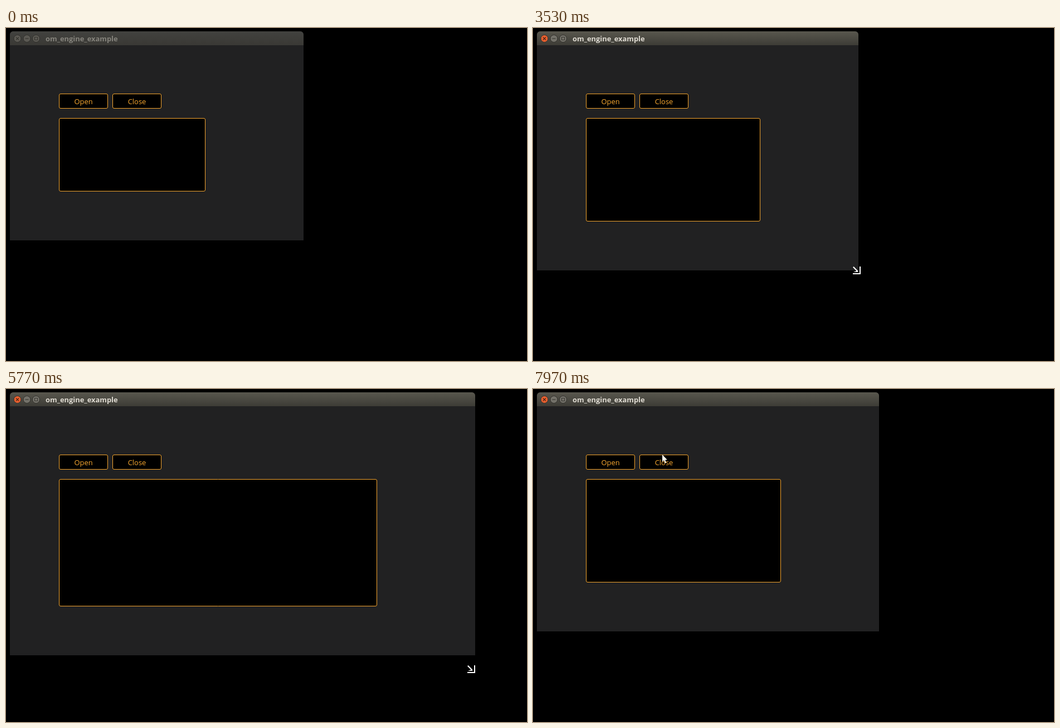
An HTML page with a canvas for the animation above (8 s loop, 935 by 599 pixels).

```html
<!DOCTYPE html>
<html lang="en">
<head>
<meta charset="utf-8">
<title>Window resize</title>
<style>
  html, body { margin: 0; height: 100%; overflow: hidden; background: #000; }
  canvas { display: block; }
</style>
</head>
<body>
<canvas id="stage" width="935" height="599"></canvas>
<script>
const ctx = document.getElementById('stage').getContext('2d');
const LOOP = 8000, POINTER_IN = 1200, AT_CORNER = 2150, GRAB = 2570, RELEASE = 7330;
const SWING = 465, LAG = 40;
const LEFT = 7, TOP = 6, TITLE_BOTTOM = 31, ORANGE = '#f4a52f';

const pose = (time, x, y) => ({ time, x, y });

// The corner swings out and back; both turning points drift down and right
const swings = Array.from({ length: 5 }, (_, n) => {
  const i = n + 1, time = GRAB + i * SWING;
  return i % 2 ? pose(time, 785 + 5 * i, 583 + 3 * i)
               : pose(time, 560 + 12.5 * i, 375 + 32.5 * i);
});

const poses = [
  pose(POINTER_IN, 872, 452), pose(1830, 577, 408), pose(GRAB, 535, 386),
  ...swings,
  pose(5290, 740, 490), pose(5690, 844, 472), pose(5880, 835, 570),
  pose(6350, 640, 590), pose(6810, 611, 512),
  pose(RELEASE, 622, 440), pose(7970, 232, 118)
];

const clamp = (v, lo, hi) => Math.min(hi, Math.max(lo, v));

// Eases from one turning point to the next
function pointerAt(time) {
  const t = clamp(time, POINTER_IN, poses[poses.length - 1].time);
  const i = Math.max(1, poses.findIndex(p => p.time >= t));
  const a = poses[i - 1], b = poses[i];
  const ease = (1 - Math.cos(Math.PI * (t - a.time) / (b.time - a.time))) / 2;
  return [a.x + (b.x - a.x) * ease, a.y + (b.y - a.y) * ease].map(Math.round);
}

function label(text, x, y, color, weight, align) {
  ctx.font = `${weight} 12.9px "Open Sans", "Noto Sans", sans-serif`;
  ctx.textAlign = align;
  ctx.fillStyle = color;
  ctx.fillText(text, x, y);
}

function outlinedBox(left, top, right, bottom) {
  ctx.beginPath();
  ctx.roundRect(left + 0.5, top + 0.5, right - left - 1, bottom - top - 1, 2.5);
  ctx.fillStyle = '#000';
  ctx.fill();
  ctx.strokeStyle = ORANGE;
  ctx.lineWidth = 1;
  ctx.stroke();
}

function button(text, left) {
  outlinedBox(left, 118, left + 88, 145);
  label(text, left + 44, 137, ORANGE, 500, 'center');
}

function titleButton(x, fill, ink, icon) {
  ctx.beginPath();
  ctx.arc(x, 19, 6.5, 0, Math.PI * 2);
  ctx.fillStyle = fill;
  ctx.fill();
  ctx.strokeStyle = '#302f2b';
  ctx.lineWidth = 1;
  ctx.stroke();
  ctx.save();
  ctx.translate(x, 19);
  ctx.strokeStyle = ink;
  ctx.lineWidth = 1.2;
  ctx.stroke(new Path2D(icon));
  ctx.restore();
}

function panel(right, bottom, fill) {
  ctx.beginPath();
  ctx.roundRect(LEFT, TOP, right - LEFT, bottom - TOP, [6, 6, 0, 0]);
  ctx.fillStyle = fill;
  ctx.fill();
}

function drawWindow(right, bottom, active) {
  const title = ctx.createLinearGradient(0, TOP, 0, TITLE_BOTTOM);
  title.addColorStop(0, active ? '#59574e' : '#42423f');
  title.addColorStop(1, active ? '#3d3c36' : '#3a3935');
  panel(right, bottom, '#212122');
  panel(right, TITLE_BOTTOM, title);

  const grey = active ? '#74726a' : '#5b5953', ink = active ? '#3a3934' : '#363530';
  titleButton(20.5, active ? '#e8602f' : grey, active ? '#4d2416' : ink, 'M-2.5-2.5L2.5 2.5M2.5-2.5L-2.5 2.5');
  titleButton(37.5, grey, ink, 'M-3 0H3');
  titleButton(54, grey, ink, 'M-2.5-2.5H2.5V2.5H-2.5Z');
  label('om_engine_example', 71, 23.5, active ? '#dfdbd2' : '#85837c', 700, 'left');

  button('Open', 95);
  button('Close', 191);
  outlinedBox(95, 162, right - 176, bottom - 88);
}

const arrow = new Path2D('M0 0V13L3 10.3 5 15.5 7.3 14.5 5.2 9.7 8.8 9.2Z');
const resizer = new Path2D('M-13-1H-1V-13H1V1H-13Z M-13-11.5L-11.5-13-4-5.5V-11-3H-12L-6.5-5Z');

function drawPointer(x, y, shape, color) {
  ctx.save();
  ctx.translate(x, y);
  ctx.fillStyle = color;
  ctx.fill(shape);
  ctx.restore();
}

function draw(t) {
  ctx.fillStyle = '#000';
  ctx.fillRect(0, 0, 935, 599);

  const [right, bottom] = pointerAt(clamp(t - LAG, GRAB, RELEASE));
  drawWindow(right - 1, bottom - 4, t >= GRAB);

  if (t >= POINTER_IN) {
    const resizing = t >= AT_CORNER && t < RELEASE + LAG;
    drawPointer(...pointerAt(t), resizing ? resizer : arrow, resizing ? '#fff' : '#f7f5ea');
  }
}

const start = performance.now();
function animate() {
  draw((performance.now() - start) % LOOP);
  requestAnimationFrame(animate);
}
animate();
</script>
</body>
</html>
```
